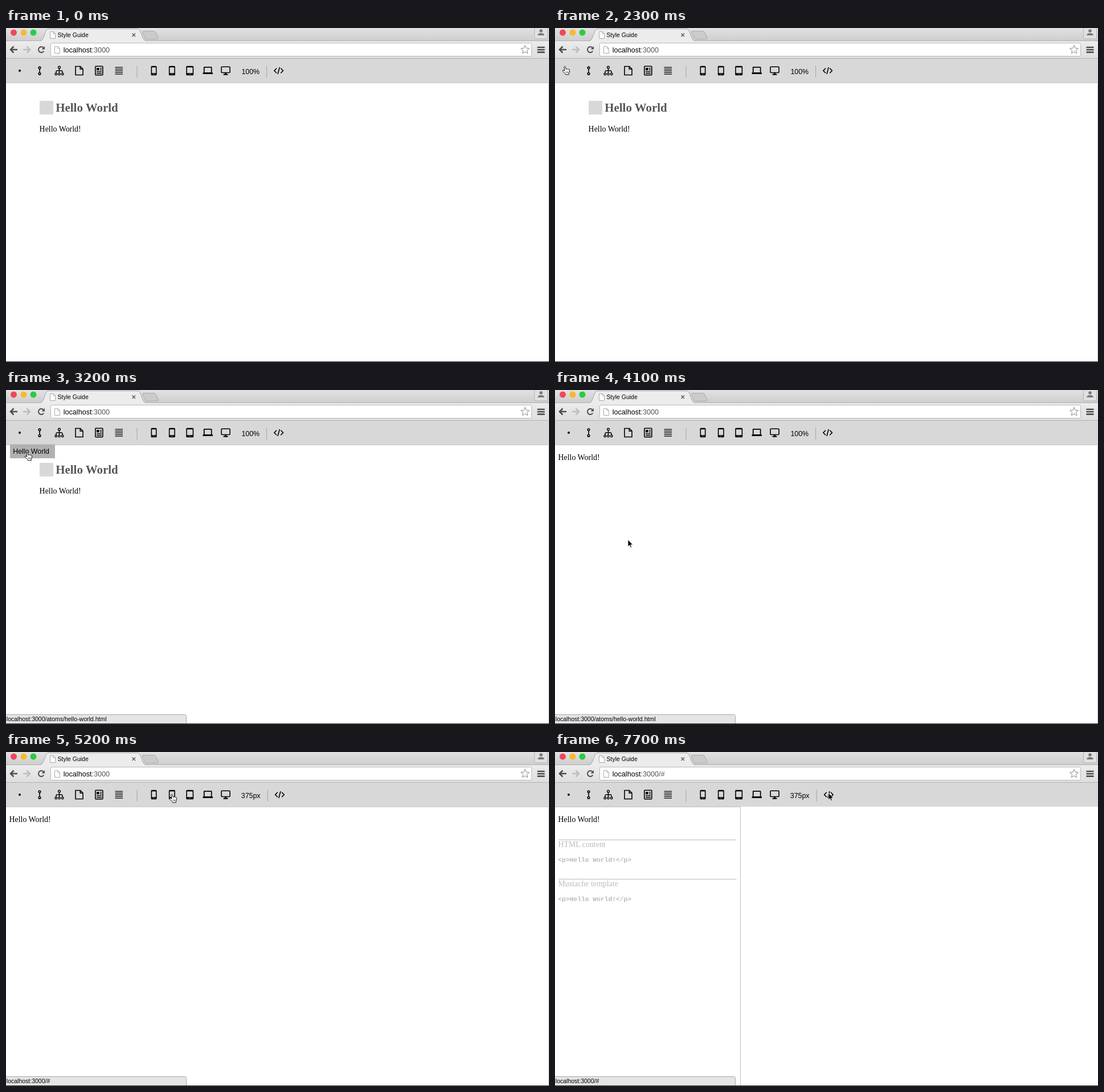
Write an HTML page that moves like this. It is 953 px wide and 587 px high and loops after 8 s.

```html
<!DOCTYPE html>
<html lang="en">
<head>
<meta charset="utf-8">
<title>Style Guide</title>
<style>
  html, body { margin: 0; width: 100%; height: 100%; overflow: hidden; background: #fff; }
  svg { display: block; width: 953px; height: 587px; }
  text { font-family: "Liberation Sans", Arial, sans-serif; white-space: pre; }
  .ui { font-size: 12.4px; }
  .small { font-size: 10.5px; }
  .serif { font: 13.9px "Liberation Serif", Times, serif; }
  .head { font: bold 20.9px "Liberation Serif", Times, serif; fill: #555; }
  .mono { font: bold 11.3px "Liberation Mono", Courier, monospace; }
  .line { fill: none; stroke: #000; stroke-width: 1.6; }
  .sep { stroke: #a6a6a6; }
</style>
</head>
<body>
<svg viewBox="0 0 953 587">
  <defs>
    <linearGradient id="strip" x2="0" y2="1"><stop stop-color="#e2e2e2"/><stop offset="1" stop-color="#cdcdcd"/></linearGradient>
    <linearGradient id="bar" x2="0" y2="1"><stop stop-color="#ececec"/><stop offset="1" stop-color="#dedede"/></linearGradient>
    <g id="sheet"><path d="M.5 .5H6L9.500 4V12.500H.5Z" fill="#fff" stroke="#aaa"/><path d="M6 .5V4H9.500" fill="none" stroke="#aaa"/></g>
  </defs>
  <rect width="953" height="587" fill="#fff"/>

  <!-- page -->
  <g id="home">
    <rect x="59" y="128" width="24" height="24" fill="#d8d8d8"/>
    <text class="head" x="87.300" y="147">Hello World</text>
    <text class="serif" x="58.600" y="182">Hello World!</text>
  </g>
  <g id="atom">
    <text class="serif" x="5.500" y="123">Hello World!</text>
    <g id="code" fill="#bbb">
      <path d="M6 154.500H318.500M6 223.500H318.500" stroke="#bbb"/>
      <text class="serif" x="5.500" y="167">HTML content</text>
      <text class="mono" x="5.300" y="192.500">&lt;p&gt;Hello World!&lt;/p&gt;</text>
      <text class="serif" x="5.500" y="236">Mustache template</text>
      <text class="mono" x="5.300" y="261.500">&lt;p&gt;Hello World!&lt;/p&gt;</text>
    </g>
  </g>
  <path id="edge" fill="none" stroke="#bcbcbc"/>

  <!-- browser -->
  <rect width="953" height="23" fill="url(#strip)"/>
  <path d="M0 22.500H953" stroke="#b0b0b0"/>
  <rect y="23" width="953" height="31" fill="url(#bar)"/>
  <path d="M60 23Q64 22 66 16L70 5Q71.500 1.500 75 1.500H230Q234 1.500 235.500 5L240 17Q242 22 246 23Z" fill="#ececec"/>
  <path d="M60 22.500Q64 22 66 16L70 5Q71.500 1.500 75 1.500H230Q234 1.500 235.500 5L240 17Q242 22 246 22.500" fill="none" stroke="#a5a5a5"/>
  <path d="M241 5.500H259Q262 5.500 263 8L267 17Q267.500 19.500 265 19.500H248Q245 19.500 244 17L239.500 8Q239 5.500 241 5.500Z" fill="#cbcbcb" stroke="#aaa"/>
  <circle cx="13.500" cy="8" r="5.500" fill="#f2465a"/>
  <circle cx="31" cy="8" r="5.500" fill="#f7b92d"/>
  <circle cx="48" cy="8" r="5.500" fill="#27cd41"/>
  <use href="#sheet" x="77" y="6"/>
  <text class="small" x="90.500" y="16">Style Guide</text>
  <path d="M221.500 9.500L227 15M227 9.500L221.500 15" stroke="#555" stroke-width="1.400"/>
  <path d="M927.500 0V16.500Q927.500 19 930 19H948Q950.500 19 950.500 16.500V0" fill="#e0e0e0" stroke="#b5b5b5"/>
  <circle cx="939" cy="5" r="2.800" fill="#777"/>
  <path d="M933.500 13V11.500Q934 9 939 9T944.500 11.500V13Z" fill="#777"/>
  <path id="arrow" d="M20 38H8M13.500 32.500L8 38L13.500 43.500" fill="none" stroke="#4d4d4d" stroke-width="2.500"/>
  <path d="M30 38H42M36.500 32.500L42 38L36.500 43.500" fill="none" stroke="#bdbdbd" stroke-width="2.500"/>
  <path d="M66.300 40.500A5 5 0 1 1 65.500 34.500" fill="none" stroke="#4d4d4d" stroke-width="2"/>
  <path d="M68 32V37.500H62.500Z" fill="#4d4d4d"/>
  <rect x="78.500" y="26.500" width="844" height="23" rx="2" fill="#fff" stroke="#b9b9b9"/>
  <use href="#sheet" x="85" y="32"/>
  <text x="100.700" y="42.500" font-size="12.640">localhost<tspan id="url" fill="#555">:3000</tspan></text>
  <path d="M911 30.500L913.100 35.400L918.400 35.900L914.400 39.400L915.600 44.600L911 41.900L906.400 44.600L907.600 39.400L903.600 35.900L908.900 35.400Z" fill="#fff" stroke="#888"/>
  <path d="M932.500 34H945.500M932.500 38.300H945.500M932.500 42.600H945.500" stroke="#4d4d4d" stroke-width="2.600"/>
  <path d="M0 53.500H953" stroke="#b3b3b3"/>

  <!-- style guide toolbar -->
  <rect y="54" width="953" height="42" fill="#d8d8d8"/>
  <circle cx="24" cy="75" r="2"/>
  <g class="line" stroke-width="1.400">
    <circle cx="59" cy="69.800" r="1.800"/><path d="M59 71.500V78.500"/><circle cx="59" cy="80.300" r="1.800"/>
  </g>
  <g class="line" style="stroke-width:1.400">
    <circle cx="93.500" cy="69.200" r="1.900"/>
    <path d="M93.500 71V79M88 79V77Q88 75 90 75H97Q99 75 99 77V79"/>
    <circle cx="87.800" cy="81" r="1.800"/><circle cx="93.500" cy="81" r="1.800"/><circle cx="99.200" cy="81" r="1.800"/>
  </g>
  <path class="line" d="M122 67.500H130.500L135 72V82.500H122ZM130.300 67.500V72.300H135"/>
  <rect class="line" x="156.800" y="67.300" width="13" height="15.400" rx="1"/>
  <path d="M159 70H163.500V74.500H159Z"/>
  <path class="line" style="stroke-width:1.400" d="M165 70.800H168M165 73.800H168M159 77H168M159 80H168"/>
  <path class="line" style="stroke-width:1.300" d="M191.500 69.200H205M191.500 72.200H205M191.500 75.200H205M191.500 78.200H205M191.500 81.200H205"/>
  <path class="sep" d="M230 66.500V87"/>
  <g id="devices"></g>
  <path d="M348 68H360Q361.500 68 361.500 69.500V78.500H363V81H345.500V78.500H346.800V69.500Q346.800 68 348 68ZM348.600 69.800V78H359.800V69.800Z" fill-rule="evenodd"/>
  <rect class="line" x="378" y="68.300" width="15" height="10.200" rx="1"/>
  <path d="M384 79H387L387.500 81H389.500V82.700H381.500V81H383.500Z"/>
  <text class="ui" id="size" y="81"></text>
  <g id="tail">
    <path class="sep" d="M457.500 66.500V87"/>
    <path class="line" d="M475 70.800L470.900 75L475 79.200M482.200 70.800L486.300 75L482.200 79.200M480.200 69L477 81"/>
  </g>

  <g id="menu">
    <rect id="item" x="7" y="95.500" width="79" height="24.500"/>
    <text class="ui" x="12.200" y="111.500">Hello World</text>
  </g>
  <g id="status">
    <path d="M-1 570.500H313.500Q316.500 570.500 316.500 573.500V587H-1Z" fill="#e5e5e5" stroke="#a8a8a8"/>
    <text class="small" id="link" x=".8" y="582" font-size="10.500"></text>
  </g>
  <path d="M0 586.500H953" stroke="#2a2a2a"/>

  <path id="pointer" d="M0 0V12.300L2.800 9.700L4.700 14L6.600 13.200L4.800 9H8.600Z" stroke="#fff" stroke-width=".8"/>
  <g id="hand" stroke="#111" stroke-width="1" stroke-linejoin="round">
    <path d="M-1.100 1.600a1.200 1.200 0 0 1 2.300 -.4L2.300 5.600a1.200 1 0 0 1 2.100 -.2a1.200 1 0 0 1 2 .3a1.100 1 0 0 1 1.900 .9l.2 3.400l-1.200 2.600v2.200H1.500L.3 12.600L-3.700 8.800a1.200 1.200 0 0 1 1.700 -1.600l1.900 1.200Z" fill="#fff"/>
    <path d="M2.300 9.500V12.300M4.200 9.500V12.300M6 9.500V12.300" stroke-width=".7"/>
  </g>
</svg>
<script>
const LOOP = 8000, STEP = 100;
const $ = id => document.getElementById(id);
const show = (id, on) => $(id).setAttribute('display', on ? 'inline' : 'none');
const move = (id, x, y) => $(id).setAttribute('transform', `translate(${x} ${y})`);
const put = (id, s) => { if ($(id).textContent !== s) $(id).textContent = s; };

// phones and tablet: centre x, width
$('devices').innerHTML = [[259.5, 10], [291.3, 11], [322.7, 13]].map(([x, w]) =>
  `<path fill-rule="evenodd" d="M${x - w / 2 + 1.5} 66.800h${w - 3}q1.500 0 1.500 1.500v13.400q0 1.500 -1.500 1.500h${3 - w}q-1.500 0 -1.500 -1.500v-13.400q0 -1.500 1.500 -1.500zM${x - w / 2 + 1.6} 69.200v10h${w - 3.2}v-10z"/>` +
  `<circle cx="${x}" cy="81.200" r=".8" fill="#d8d8d8"/>`).join('');

// pointer path: time, x, y
const path = [
  [1300, 863, 576], [1400, 590, 524], [1500, 401, 488], [1700, 401, 488],
  [1800, 348, 448], [2000, 168, 236], [2200, 38, 92], [2300, 17, 67],
  [2600, 20, 72], [2900, 20, 73], [3200, 37, 109], [3900, 37, 109],
  [4000, 72, 172], [4100, 128, 263], [4200, 203, 282], [4300, 280, 232],
  [4400, 318, 178], [4500, 326, 157], [4600, 345, 97], [4800, 291, 74],
  [6400, 291, 74], [6500, 346, 75], [6800, 400, 80], [7100, 462, 76],
  [7300, 480, 72], [8000, 480, 72]
];
const handTimes = [[2300, 4000], [4700, 6600], [7200, 7700]];
const within = (t, a, b) => t >= a && t < b;

function pointerAt(t) {
  const i = path.findIndex(k => k[0] > t);
  const [t0, x0, y0] = path[i - 1], [t1, x1, y1] = path[i];
  const p = (t - t0) / (t1 - t0);
  return [x0 + (x1 - x0) * p, y0 + (y1 - y0) * p];
}

function draw(t) {
  show('home', t < 3700);
  show('atom', t >= 3700);
  show('code', t >= 7700);
  put('url', t >= 7700 ? ':3000/#' : ':3000');

  const narrow = t >= 5200;
  put('size', narrow ? '375px' : '100%');
  $('size').setAttribute('x', narrow ? 412.8 : 413.4);
  move('tail', narrow ? 1.7 : 0, 0);

  const p = Math.min(1, Math.max(0, (t - 5200) / 400));
  const w = 952.5 - 627 * (1 - (1 - p) ** 2);
  $('edge').setAttribute('d', `M0 96.500H${w}V587`);
  $('edge').setAttribute('stroke', p ? '#bcbcbc' : '#c8c8c8');

  show('menu', within(t, 2800, 4000));
  $('item').setAttribute('fill', t >= 3100 ? '#b1b1b1' : '#d8d8d8');
  show('status', within(t, 2700, 4400) || t >= 4900);
  put('link', within(t, 3100, 4900) ? 'localhost:3000/atoms/hello-world.html' : 'localhost:3000/#');

  const visible = t >= 1300;
  const hand = handTimes.some(([a, b]) => within(t, a, b));
  show('hand', visible && hand);
  show('pointer', visible && !hand);
  if (visible) move(hand ? 'hand' : 'pointer', ...pointerAt(t));
}

const start = performance.now();
function tick() {
  const t = (performance.now() - start) % LOOP;
  draw(Math.floor(t / STEP) * STEP);
  requestAnimationFrame(tick);
}
tick();
</script>
</body>
</html>
```
